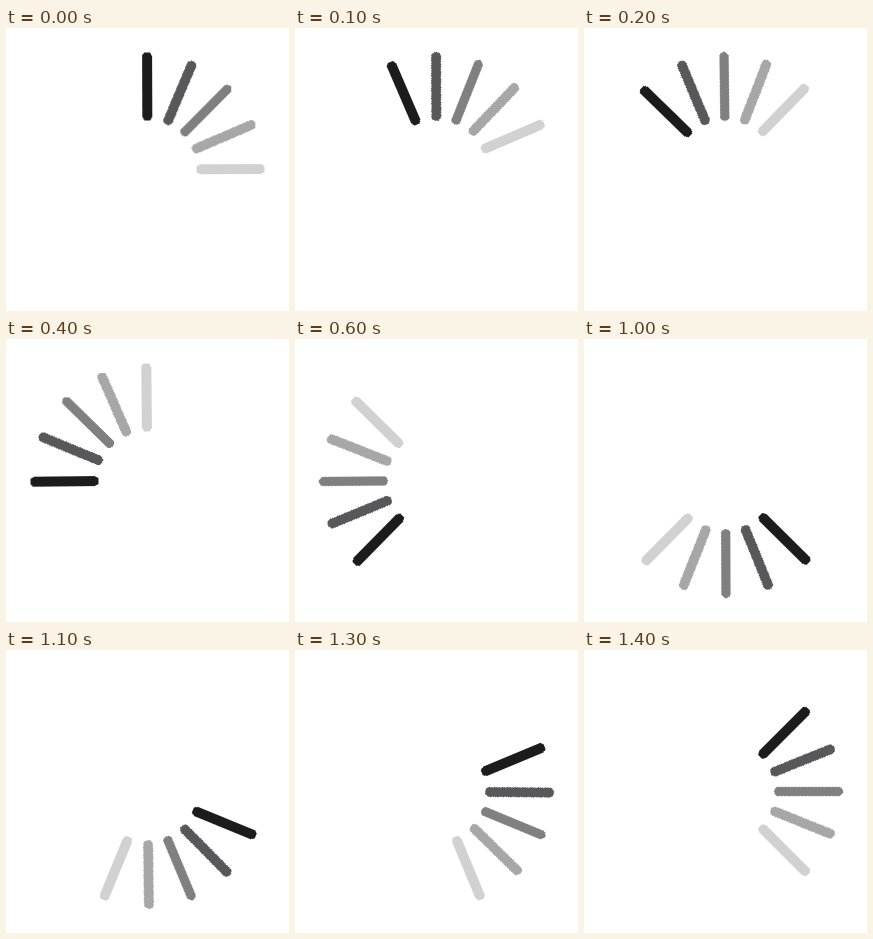
An HTML page for the animation above (1500 ms loop, 283 by 283 pixels).

```html
<!DOCTYPE html>
<html lang="en">
<head>
<meta charset="utf-8">
<title>Spinner</title>
<style>
  html, body { margin: 0; height: 100%; overflow: hidden; background: #fff; }
  svg { display: block; width: 100vw; height: 100vh; }
  line { stroke-width: 9.7; stroke-linecap: round; shape-rendering: crispEdges; }
  .spin { transform-origin: 0 0; animation: spin 1500ms infinite; }

  /* Fifteen hard poses: one at rest, then fourteen equal turns */
  @keyframes spin {
    0% { transform: rotate(-0.2deg); animation-timing-function: step-end; }
    6.6666% { transform: rotate(-23.3deg); animation-timing-function: steps(14, end); }
    100% { transform: rotate(-337.43deg); }
  }
</style>
</head>
<body>
<svg viewBox="0 0 283 283" aria-label="Loading">
  <g transform="translate(141.5 141.5)">
    <g class="spin">
      <line y1="-53.4" y2="-112.7" stroke="#d1d1d1" transform="rotate(90)"/>
      <line y1="-53.4" y2="-112.7" stroke="#a7a7a7" transform="rotate(67)"/>
      <line y1="-53.4" y2="-112.7" stroke="#808080" transform="rotate(45)"/>
      <line y1="-53.4" y2="-112.7" stroke="#58585a" transform="rotate(23.1)"/>
      <line y1="-53.4" y2="-112.7" stroke="#1c1c1d"/>
    </g>
  </g>
</svg>
</body>
</html>
```
